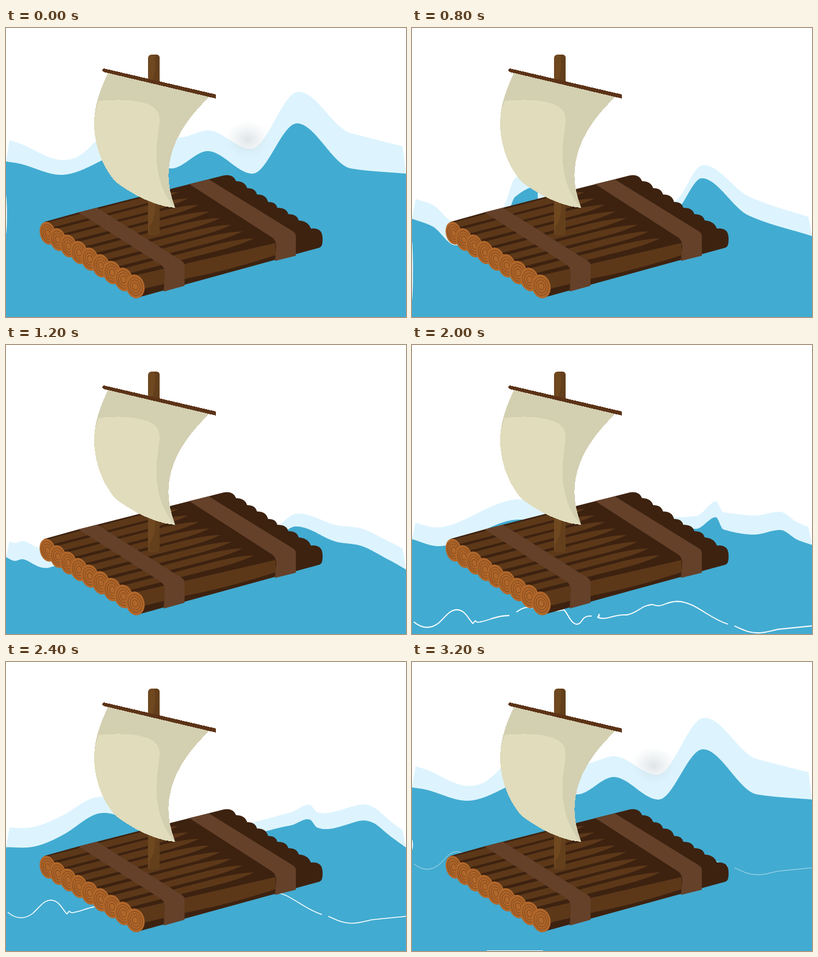
An HTML page that plays this animation: 690 by 500 pixels, repeating every 3.7 s.

```html
<!DOCTYPE html>
<html lang="en">
<head>
<meta charset="utf-8">
<title>Raft at sea</title>
<style>
html, body { margin: 0; width: 100%; height: 100%; overflow: hidden; background: #fff; }
svg { display: block; width: 690px; height: 500px; }
</style>
</head>
<body>
<svg viewBox="0 0 690 500">
  <defs>
    <radialGradient id="haze">
      <stop offset="0" stop-color="#b8c4ca" stop-opacity=".45"/>
      <stop offset="1" stop-color="#c8d6dc" stop-opacity="0"/>
    </radialGradient>
  </defs>
  <path id="foam" fill="#ddf4fe"/>
  <ellipse id="smudge" cx="417" rx="40" ry="33" fill="url(#haze)"/>
  <path id="water" fill="#42abd1"/>
  <ellipse id="gap" rx="1.6" fill="#fff"/>
  <path id="ripple" fill="none" stroke="#fff" stroke-linejoin="round" d="M3,479 Q25,497 46,481 C58,470 65,458 78,458 C92,459 96,472 105,482 L109,477 Q112,481 118,479 C135,476 145,468 168,468 M180,462 L188,457 Q198,452 206,455 C225,450 240,465 262,458 C270,466 274,483 285,483 C296,482 290,468 310,469 M320,472 L323,466 322,472 C340,476 350,465 370,467 C390,464 395,450 415,449 C432,456 435,444 458,443.5 C490,445 510,472 545,483 M556,486 C570,492 580,498 596,498 C615,498 622,492 640,491 L690,486"/>
  <path id="edge" stroke="#fff" d="M129,499.5 H226"/>

  <path fill="#3d2210" d="M66,335.5 L125,319 L376,255 Q392,252 397,265 q15,0 19,12 q14,0 17,11 q16,0 19,13 q13,-1 16,10 q16,0 19,11 q15,0 18,11 q16,1 21,14 Q545,345 546,362 Q547,378 541,380 L225,467 Z"/>
  <g id="grain" fill="#5c3819"></g>
  <g id="ends"></g>
  <g fill="#65412a">
    <path d="M125,319 L157,311 L300,401 Q308,405 308,411 V446 L272,456 L274,425 Q275,415 266,409 Z"/>
    <path d="M316,270 L350,262 L492,350 Q500,354 500,360 V394 L464,403 L466,378 Q467,370 460,363 Z"/>
  </g>

  <rect x="245" y="46" width="20" height="313" rx="6" fill="#6f4820"/>
  <path fill="#643f1c" d="M256,46 Q260,66 252,96 H265 V52 Q265,46 259,46 Z M257,300 Q259,330 247,344 V352 Q247,359 251,359 H259 Q265,359 265,353 V300 Z"/>
  <g shape-rendering="crispEdges">
    <path fill="#d3cfb1" d="M178,74 L351,119 C308,160 257,225 292,311 C262,309 225,293 190,267 C165,240 152,200 152,165 C152,135 163,103 178,74 Z"/>
    <path fill="#e0dcbc" d="M160,126 C195,123 235,123 256,138 C270,150 264,165 261,195 C256,235 263,280 291,311 C262,309 225,293 190,267 C165,240 152,200 152,165 C152,150 155,140 160,126 Z"/>
    <path fill="#5c3317" d="M169,70 L362,115 V122 L168,76 Q164,72 169,70 Z"/>
  </g>
</svg>
<script>
const $ = id => document.getElementById(id);
const STEP = 400, LOOP = 3700, W = 690, BOTTOM = 500;

// Monotone cubic through [x, y] points, returned as y(x)
function curve(p) {
  const slope = i => (p[i + 1][1] - p[i][1]) / (p[i + 1][0] - p[i][0]);
  const tangent = i => {
    if (!i || i === p.length - 1) return slope(i ? i - 1 : 0);
    const a = slope(i - 1), b = slope(i);
    return a * b <= 0 ? 0 : 2 * a * b / (a + b);
  };
  return x => {
    let i = 0;
    while (i < p.length - 2 && x > p[i + 1][0]) i++;
    const [x0, y0] = p[i], [x1, y1] = p[i + 1], h = x1 - x0, u = (x - x0) / h, v = 1 - u;
    return v * v * (1 + 2 * u) * y0 + u * u * (1 + 2 * v) * y1
      + u * v * h * (v * tangent(i) - u * tangent(i + 1));
  };
}

// Water runs through a few crests and troughs; foam rides on it with evenly spaced depths
function sea(keys, depths) {
  const water = curve(keys);
  const depth = curve(depths.map((d, i) => [W * i / (depths.length - 1), d]));
  const foam = x => water(x) - depth(x) * Math.min(1, x / 6, (W - x) / 6);
  return { water, foam };
}

const high = sea(
  [[0, 231], [20, 234], [95, 254], [220, 212], [285, 243], [348, 213], [425, 252], [502, 165], [595, 243], [690, 252]],
  [38, 25, 75, 36, 48, 62, 46]);
const falling = sea(
  [[0, 330], [35, 343], [75, 376], [155, 350], [178, 292], [216, 274], [218, 310], [450, 318], [500, 260], [580, 324], [690, 360]],
  [36, 40, 25, 20, 18, 33, 31]);
const low = sea(
  [[0, 404], [14, 412], [30, 401], [47, 405], [93, 386], [200, 371], [546, 367], [605, 357], [660, 392], [690, 417]],
  [25, 28, 15, 15, 20, 25, 35]);
const rising = sea(
  [[0, 336], [45, 348], [185, 302], [300, 315], [490, 318], [524, 298], [537, 319], [590, 328], [635, 320], [665, 337], [690, 346]],
  [30, 35, 35, 25, 20, 33, 29]);
const swell = sea(
  [[0, 305], [53, 289], [100, 264], [163, 218], [283, 295], [400, 286], [513, 244], [545, 256], [613, 225], [655, 259], [690, 296]],
  [38, 32, 8, 15, 22, 24, 22]);

// Each step blends two seas; ripple is its vertical shift, gap is [x, y, ry]
const steps = [
  { seas: [high, high], haze: true, gap: [0, 323, 33] },
  { seas: [high, falling] },
  { seas: [falling, falling], gap: [0, 420, 50] },
  { seas: [falling, low] },
  { seas: [low, low], ripple: 40, line: 2 },
  { seas: [rising, rising], ripple: 0, line: 1.8 },
  { seas: [rising, swell], ripple: -46, line: 1.5 },
  { seas: [swell, swell], ripple: -92, line: 1.2, gap: [690, 312, 20] },
  { seas: [high, high], shift: -14, haze: true, ripple: -130, line: 1, gap: [0, 316, 9], edge: true }
];

function area([a, b], layer, shift) {
  let d = `M0,${BOTTOM}`;
  for (let x = 0; x <= W; x++)
    d += `L${x},${((a[layer](x) + b[layer](x)) / 2 + shift).toFixed(1)}`;
  return d + `V${BOTTOM}Z`;
}

function set(id, attrs) {
  for (const k in attrs) $(id).setAttribute(k, attrs[k]);
}
const show = (id, on) => set(id, { visibility: on ? 'visible' : 'hidden' });

function draw({ seas, shift = 0, haze, ripple = 0, line = 0, gap, edge }) {
  for (const layer of ['foam', 'water']) set(layer, { d: area(seas, layer, shift) });
  show('smudge', haze);
  set('smudge', { cy: 193 + shift });
  show('gap', gap);
  if (gap) set('gap', { cx: gap[0], cy: gap[1], ry: gap[2] });
  show('ripple', line);
  set('ripple', { transform: `translate(0 ${ripple})`, 'stroke-width': line, opacity: line > 1 ? 1 : .6 });
  show('edge', edge);
}

// Logs grow and spread slightly towards the viewer
function buildLogs(count) {
  const streak = 'M0,-19 L165,-62 Q205,-71 225,-71 Q200,-59 160,-49 L0,-8 Z';
  const front = 'M0,-19 L242,-75 V-54 Q160,-27 85,-13 L8,6 Z';
  for (let i = 0; i < count; i++) {
    const x = 72 + 17.5 * i + .17 * i * i, y = 355 + 10.9 * i + .075 * i * i;
    const rx = 13.6 + i * .3, ry = 20 + i * .1, at = `translate(${x} ${y})`;
    const ring = k => `<ellipse rx="${rx * k}" ry="${ry * k}"/>`;
    $('grain').innerHTML += `<path transform="${at}" d="${i < count - 1 ? streak : front}"/>`;
    $('ends').innerHTML += `<g transform="${at} rotate(-14)" fill="#b1672a" stroke="#8f5120" stroke-width="1.6">
      <g stroke="none">${ring(1)}</g>${[.76, .54, .3].map(ring).join('')}</g>`;
  }
}

let current = -1;
function tick() {
  const i = Math.min(steps.length - 1, Math.floor(performance.now() % LOOP / STEP));
  if (i !== current) draw(steps[current = i]);
  requestAnimationFrame(tick);
}
buildLogs(9);
tick();
</script>
</body>
</html>
```
